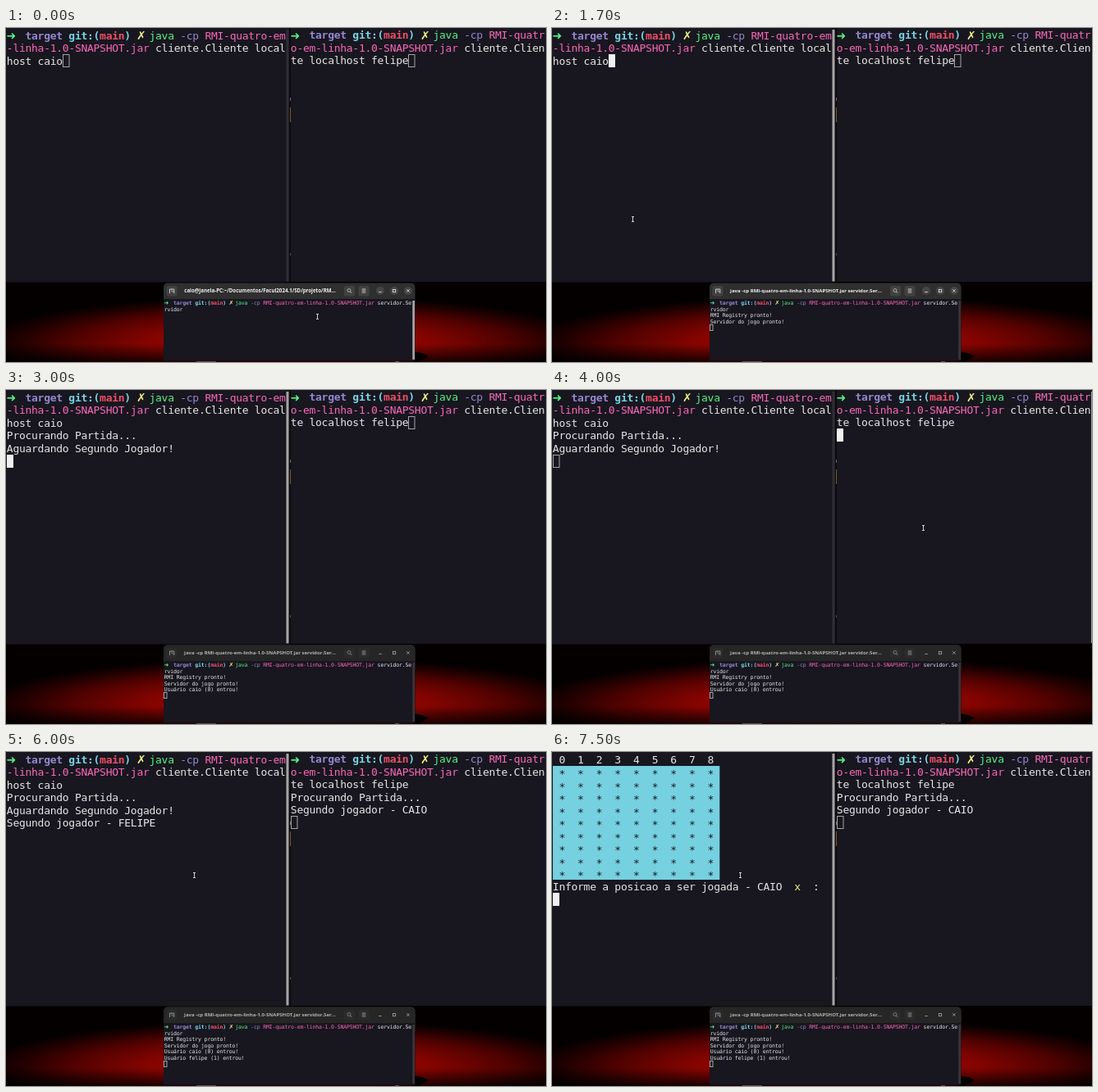
Write an HTML page with a canvas that moves like this. It is 658 by 408 pixels and loops after 8000 ms.

```html
<!DOCTYPE html>
<html lang="pt">
<head>
<meta charset="utf-8">
<style>
html, body { margin: 0; width: 100%; height: 100%; overflow: hidden; background: #000; }
canvas { display: block; }
</style>
</head>
<body>
<canvas id="stage" width="658" height="408"></canvas>
<script>
const ctx = document.getElementById('stage').getContext('2d');
const LOOP = 8000, STEP = 100, BLINK = 600;
const MONO = '"DejaVu Sans Mono", "Noto Sans Mono", monospace';
const SYMBOL = '"DejaVu Sans", sans-serif';
const C = {
  bg: '#18161f', text: '#e6e6e6', green: '#55f283', purple: '#9488d0', cyan: '#76d5e6',
  red: '#ee4f68', yellow: '#eff283', pink: '#f968b8', board: '#75d0df', bar: '#a6a4a4'
};

const left = { x: 1, y: 1.5, cell: 7.55, line: 15.5, size: 13, wrap: 45 };
const right = { x: 347, y: 0.9, cell: 7.55, line: 15.5, size: 13, wrap: 41 };
const server = { x: 192.7, y: 332, cell: 3.768, line: 7.5, size: 6.5, wrap: 80 };

function rect(x, y, w, h, color) {
  ctx.fillStyle = color;
  ctx.fillRect(x, y, w, h);
}

function round(x, y, w, h, r, color) {
  ctx.fillStyle = color;
  ctx.beginPath();
  ctx.roundRect(x, y, w, h, r);
  ctx.fill();
}

function path(points, color, width = 0.8) {
  ctx.strokeStyle = color;
  ctx.lineWidth = width;
  ctx.beginPath();
  points.forEach(([x, y], i) => i ? ctx.lineTo(x, y) : ctx.moveTo(x, y));
  ctx.stroke();
}

function write(term, row, col, text, color = C.text, weight = 400, dy = 0) {
  ctx.font = `${weight} ${term.size}px ${MONO}`;
  ctx.letterSpacing = '0px';
  const gap = term.cell - ctx.measureText('0').width;
  ctx.letterSpacing = gap + 'px';
  ctx.fillStyle = color;
  const baseline = term.y + row * term.line + term.line * 0.8 + dy;
  ctx.fillText(text, term.x + col * term.cell + gap / 2, baseline);
  ctx.letterSpacing = '0px';
}

function symbol(term, col, char, color) {
  ctx.font = `bold ${term.cell * 1.85}px ${SYMBOL}`;
  ctx.fillStyle = color;
  ctx.fillText(char, term.x + col * term.cell - term.cell * 0.08, term.y + term.line * 0.82);
}

// Writes coloured runs one after another, breaking at the terminal's last column.
function flow(term, col, runs) {
  for (const [text, color] of runs) {
    let rest = text;
    while (rest) {
      const room = term.wrap - col % term.wrap;
      const part = rest.slice(0, room);
      write(term, Math.floor(col / term.wrap), col % term.wrap, part, color);
      col += part.length;
      rest = rest.slice(room);
    }
  }
}

function prompt(term, command) {
  symbol(term, 0, '➜', C.green);
  write(term, 0, 3, 'target', C.purple, 700);
  write(term, 0, 10, 'git:(', C.cyan, 700);
  write(term, 0, 15, 'main', C.red, 700);
  write(term, 0, 19, ')', C.cyan, 700);
  symbol(term, 21, '✗', C.yellow);
  flow(term, 23, [
    ['java ', C.green], ['-cp ', C.purple],
    ['RMI-quatro-em-linha-1.0-SNAPSHOT.jar ', C.pink], [command, C.text]
  ]);
}

function lines(term, row, list) {
  list.forEach((text, i) => write(term, row + i, 0, text));
}

// With focus the block blinks, counting from its last reset; otherwise it is an outline.
function cursor(term, row, col, focused, age = 0) {
  const x = Math.round(term.x + col * term.cell - 0.3);
  const y = Math.round(term.y + row * term.line - 0.3);
  const w = Math.round(term.cell), h = Math.round(term.line);
  if (!focused) {
    ctx.strokeStyle = '#a4a4a6';
    ctx.lineWidth = 1;
    ctx.strokeRect(x + 0.5, y + 0.5, w - 0.5, h - 1);
  } else if (Math.floor(age / BLINK) % 2 === 0) {
    rect(x, y, w, h, '#f0f0f0');
  }
}

function desktop() {
  rect(0, 0, 658, 408, '#000');
  ctx.save();
  ctx.beginPath();
  ctx.rect(0, 311, 658, 97);
  ctx.clip();
  ctx.translate(345, 385);
  ctx.scale(375, 58);
  const glow = ctx.createRadialGradient(0, 0, 0, 0, 0, 1);
  glow.addColorStop(0, '#980500');
  glow.addColorStop(0.45, '#860400');
  glow.addColorStop(0.7, '#520200');
  glow.addColorStop(0.87, '#220100');
  glow.addColorStop(1, '#050000');
  ctx.fillStyle = glow;
  ctx.fillRect(-1, -1.3, 2, 2.6);
  ctx.restore();
  const floor = ctx.createLinearGradient(0, 386, 0, 408);
  floor.addColorStop(0, 'rgba(0,0,0,0)');
  floor.addColorStop(1, 'rgba(0,0,0,.75)');
  rect(0, 386, 658, 22, floor);
  ctx.fillStyle = '#050000';
  ctx.beginPath();
  ctx.moveTo(496, 395);
  ctx.quadraticCurveTo(510, 397, 515, 401);
  ctx.lineTo(503, 408);
  ctx.lineTo(496, 408);
  ctx.fill();
}

function drawLeft(t, focused) {
  rect(0, 0, 345, 310.5, C.bg);
  rect(341.5, 2, 3, 307.5, focused ? C.bar : '#302e35');
  if (t >= 6100) {
    const digits = [...Array(9).keys()];
    write(left, 0, 0, digits.map(n => ` ${n} `).join(''));
    rect(1, 17, 203.3, 139, C.board);
    for (const row of digits) write(left, row + 1, 0, ' * '.repeat(9), C.bg, 400, 2);
    if (t >= 6200) {
      write(left, 10, 0, 'Informe a posicao a ser jogada - CAIO');
      write(left, 10, 39, 'x', C.yellow);
      write(left, 10, 42, ':');
      cursor(left, 11, 0, true, t - 5100);
    }
    return;
  }
  prompt(left, 'cliente.Cliente localhost caio');
  if (t >= 3000) lines(left, 3, ['Procurando Partida...', 'Aguardando Segundo Jogador!']);
  if (t >= 6000) write(left, 5, 0, 'Segundo jogador - FELIPE');
  const since = t >= 5100 ? 5100 : t >= 2600 ? 2600 : 1700;
  if (t < 2600) cursor(left, 2, 9, focused, t - since);
  else cursor(left, t >= 6000 ? 6 : t >= 3000 ? 5 : 3, 0, focused, t - since);
}

function drawRight(t, focused) {
  rect(345, 0, 2, 310.5, '#0b0a0e');
  rect(347, 0, 311, 310, C.bg);
  rect(346, 97, 1, 18, '#7c5a22');
  rect(346, 85, 1, 4, '#69666c');
  rect(346, 275, 1, 3, '#4c494f');
  if (focused) rect(657, 2, 1, 307, C.bar);
  prompt(right, 'cliente.Cliente localhost felipe');
  if (t >= 4500) lines(right, 3, ['Procurando Partida...', 'Segundo jogador - CAIO']);
  if (t < 4000) cursor(right, 2, 19, focused, t - 3500);
  else cursor(right, t >= 4500 ? 5 : 3, 0, focused, t - 4000);
}

function titleBar(t) {
  const fade = Math.min(1, Math.max(0, (t - 1700) / 200));
  round(192, 311.5, 306.5, 30, [5, 5, 0, 0], '#302f30');
  ctx.globalAlpha = fade;
  round(192, 311.5, 306.5, 30, [5, 5, 0, 0], '#272627');
  ctx.globalAlpha = 1 - fade * 0.8;
  for (const x of [202, 418.5, 436]) round(x - 6.5, 315, 13, 12.5, 2.5, '#424142');
  ctx.globalAlpha = 1 - fade;
  for (const x of [456, 473, 490]) round(x - 5, 316, 10, 10, 5, '#474647');
  ctx.globalAlpha = 1;

  const ink = fade < 1 ? '#e8e8e8' : '#a6a5a6';
  path([[199.5, 324], [199.5, 319], [204.8, 319], [204.8, 324]], ink);
  path([[202.1, 319], [202.1, 322], [204.8, 322]], ink, 0.6);
  ctx.beginPath();
  ctx.arc(418, 320.5, 2, 0, 7);
  ctx.stroke();
  path([[419.5, 322], [421.2, 323.8]], ink);
  for (const y of [319, 321, 323]) path([[433.7, y], [438.3, y]], ink);
  path([[454.2, 322.5], [457.8, 322.5]], ink);
  ctx.strokeRect(471.4, 319.4, 3.3, 3.3);
  path([[488.2, 319.2], [491.6, 322.7]], ink);
  path([[491.6, 319.2], [488.2, 322.7]], ink);

  const title = t < 600
    ? 'caio@janela-PC:~/Documentos/Facul2024.1/SD/projeto/RM...'
    : 'java -cp RMI-quatro-em-linha-1.0-SNAPSHOT.jar servidor.Ser...';
  const face = size => `bold ${size}px "Open Sans", "Noto Sans", sans-serif`;
  ctx.font = face(10);
  ctx.font = face(1850 / ctx.measureText(title).width);
  ctx.fillStyle = fade < 1 ? '#f2f2f2' : '#b4b3b4';
  ctx.textAlign = 'center';
  ctx.fillText(title, 309.5, 323.3);
  ctx.textAlign = 'left';
}

function drawServer(t, focused) {
  titleBar(t);
  rect(192, 331, 306.5, 75.5, C.bg);
  rect(495.3, 333, 2.7, 72, focused ? C.bar : '#37353b');
  rect(232, 407, 24, 1, '#55504f');
  rect(474, 407, 5, 1, '#55504f');
  prompt(server, 'servidor.Servidor');
  const log = [];
  if (t >= 900) log.push('RMI Registry pronto!', 'Servidor do jogo pronto!');
  if (t >= 3000) log.push('Usuário caio (0) entrou!');
  if (t >= 4500) log.push('Usuário felipe (1) entrou!');
  lines(server, 2, log);
  if (t >= 700) cursor(server, 2 + log.length, 0, focused, t - 700);
}

// Each trip: visible from, moves from, arrives, hidden at, start point, end point.
const trips = [
  [0, 1200, 1600, 2600, [379, 352], [98, 233]],
  [3100, 3000, 3500, 4100, [98, 233], [452, 168]],
  [4600, 4500, 5000, LOOP, [452, 168], [229, 150]]
];

function pointer(t) {
  const trip = trips.find(([shown, , , hidden]) => t >= shown && t < hidden);
  if (!trip) return;
  const [, start, end, , from, to] = trip;
  const p = Math.min(1, Math.max(0, (t - start) / (end - start)));
  const ease = p * p * (3 - 2 * p);
  const x = Math.round(from[0] + (to[0] - from[0]) * ease) + 0.5;
  const y = Math.round(from[1] + (to[1] - from[1]) * ease) + 0.5;
  path([[x, y - 3], [x, y + 3]], '#d0d0d0', 1);
  for (const side of [-3, 3]) path([[x - 1.5, y + side], [x + 1.5, y + side]], '#d0d0d0', 1);
}

function focusAt(t) {
  if (t < 1700) return server;
  return t >= 3500 && t < 5100 ? right : left;
}

function frame() {
  const t = Math.floor(performance.now() % LOOP / STEP) * STEP;
  const active = focusAt(t);
  desktop();
  drawLeft(t, active === left);
  drawRight(t, active === right);
  drawServer(t, active === server);
  pointer(t);
  requestAnimationFrame(frame);
}
frame();
</script>
</body>
</html>
```
